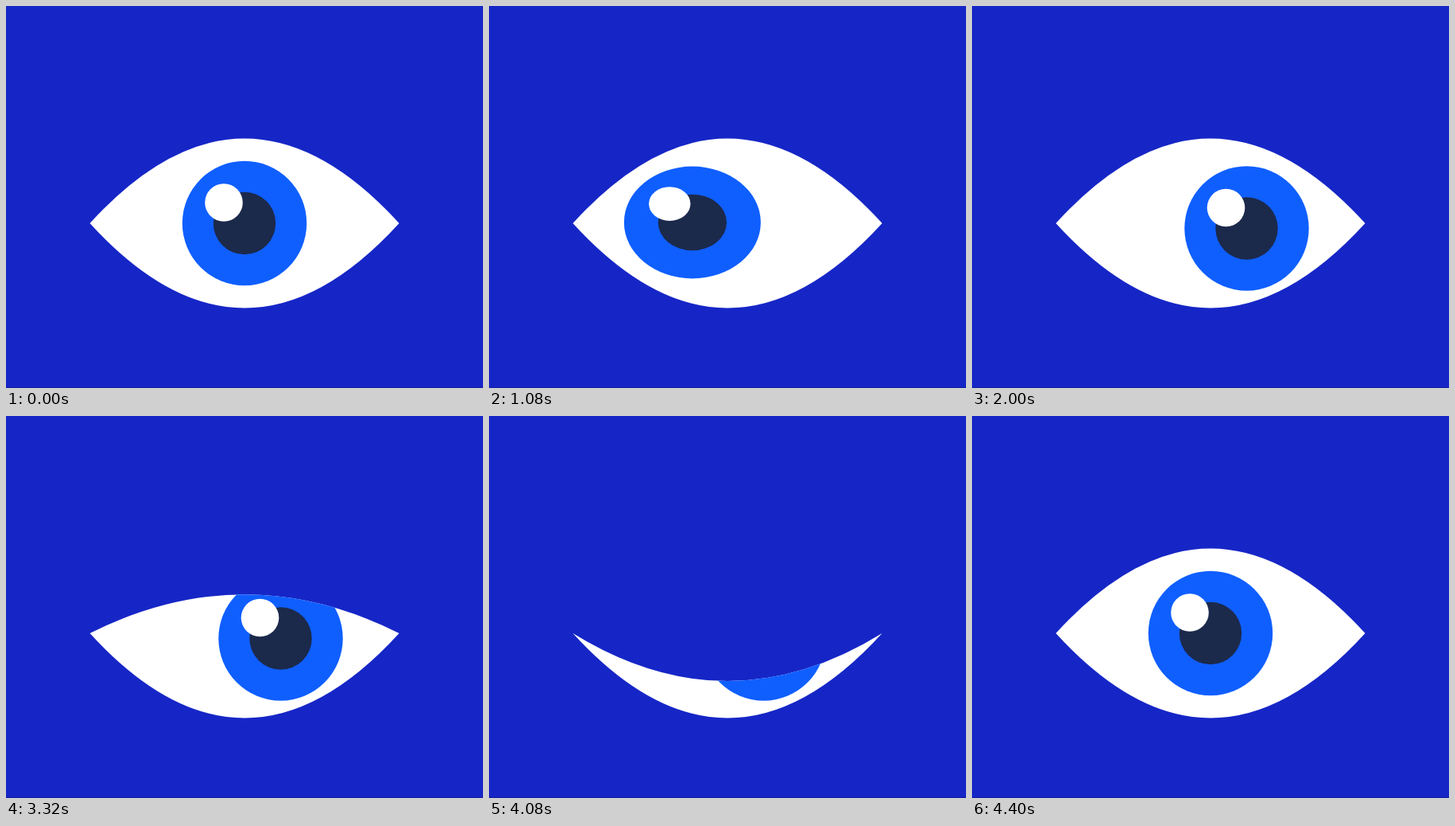
Recreate the animation shown at these times as an HTML page. Size 600 by 480 pixels, loop 5120 ms.

```html
<!DOCTYPE html>
<html lang="en">
<head>
<meta charset="utf-8">
<title>Blinking eye</title>
<style>
  html, body { margin: 0; width: 100%; height: 100%; overflow: hidden; background: #1626c6; }
  svg { display: block; width: 100%; height: 100%; }
</style>
</head>
<body>
<svg viewBox="0 0 600 480">
  <defs>
    <clipPath id="opening"><path id="lids"/></clipPath>
  </defs>
  <rect width="600" height="480" fill="#1626c6"/>
  <rect y="479" width="600" height="1" fill="#131f9c"/>
  <path id="white" fill="#fff"/>
  <g clip-path="url(#opening)">
    <g id="iris">
      <circle r="78.2" fill="#0f5fff"/>
      <circle r="39.2" fill="#1b294b"/>
      <circle cx="-26" cy="-26" r="23.8" fill="#fff"/>
    </g>
  </g>
</svg>
<script>
  const LOOP = 5120;
  const MID = 273, OPEN = 166.5, SHUT = 379.5;
  const CENTER = [300, 273], LEFT = [235.4, 271.5], RIGHT = [345.5, 279.5];

  const blinks = [801.5, 3307, 4035.3];
  const glances = [
    { at: 1043.5, from: CENTER, to: LEFT },
    { at: 1780, from: LEFT, to: RIGHT },
    { at: 4210, from: RIGHT, to: CENTER }
  ];

  const white = document.getElementById('white');
  const lids = document.getElementById('lids');
  const iris = document.getElementById('iris');

  const clamp = v => Math.min(1, Math.max(0, v));
  const mix = (a, b, k) => a + (b - a) * k;
  const smooth = v => { const k = clamp(v); return k * k * (3 - 2 * k); };

  // 0 is open, 1 is shut: fast close, short hold, then reopen.
  function closure(t) {
    if (t <= 0 || t >= 203) return 0;
    if (t < 80) return Math.sin(t / 80 * Math.PI / 2);
    return 1 - smooth((t - 125) / 78);
  }

  // Widens during the dart, then recoils and settles.
  function stretch(t) {
    if (t <= 0 || t >= 185) return 0;
    if (t < 36) return 0.1 * smooth(t / 36);
    if (t < 85) return mix(0.1, -0.105, smooth((t - 36) / 49));
    return -0.105 * (1 - smooth((t - 85) / 100));
  }

  function draw(t) {
    const shut = Math.max(...blinks.map(at => closure(t - at)));
    const upper = 2 * mix(OPEN, SHUT, shut) - MID;
    const lower = 2 * SHUT - MID;
    const shape = `M105.5 ${MID}Q300 ${upper} 494.5 ${MID}Q300 ${lower} 105.5 ${MID}Z`;
    white.setAttribute('d', shape);
    lids.setAttribute('d', shape);

    let [x, y] = CENTER, k = 0;
    for (const { at, from, to } of glances) {
      if (t < at) break;
      const p = smooth((t - at) / 60);
      x = mix(from[0], to[0], p);
      y = mix(from[1], to[1], p);
      k = stretch(t - at);
    }
    iris.setAttribute('transform', `translate(${x} ${y}) scale(${1 + k} ${1 - k})`);
  }

  const start = performance.now();
  function tick() {
    draw((performance.now() - start) % LOOP);
    requestAnimationFrame(tick);
  }
  tick();
</script>
</body>
</html>
```
